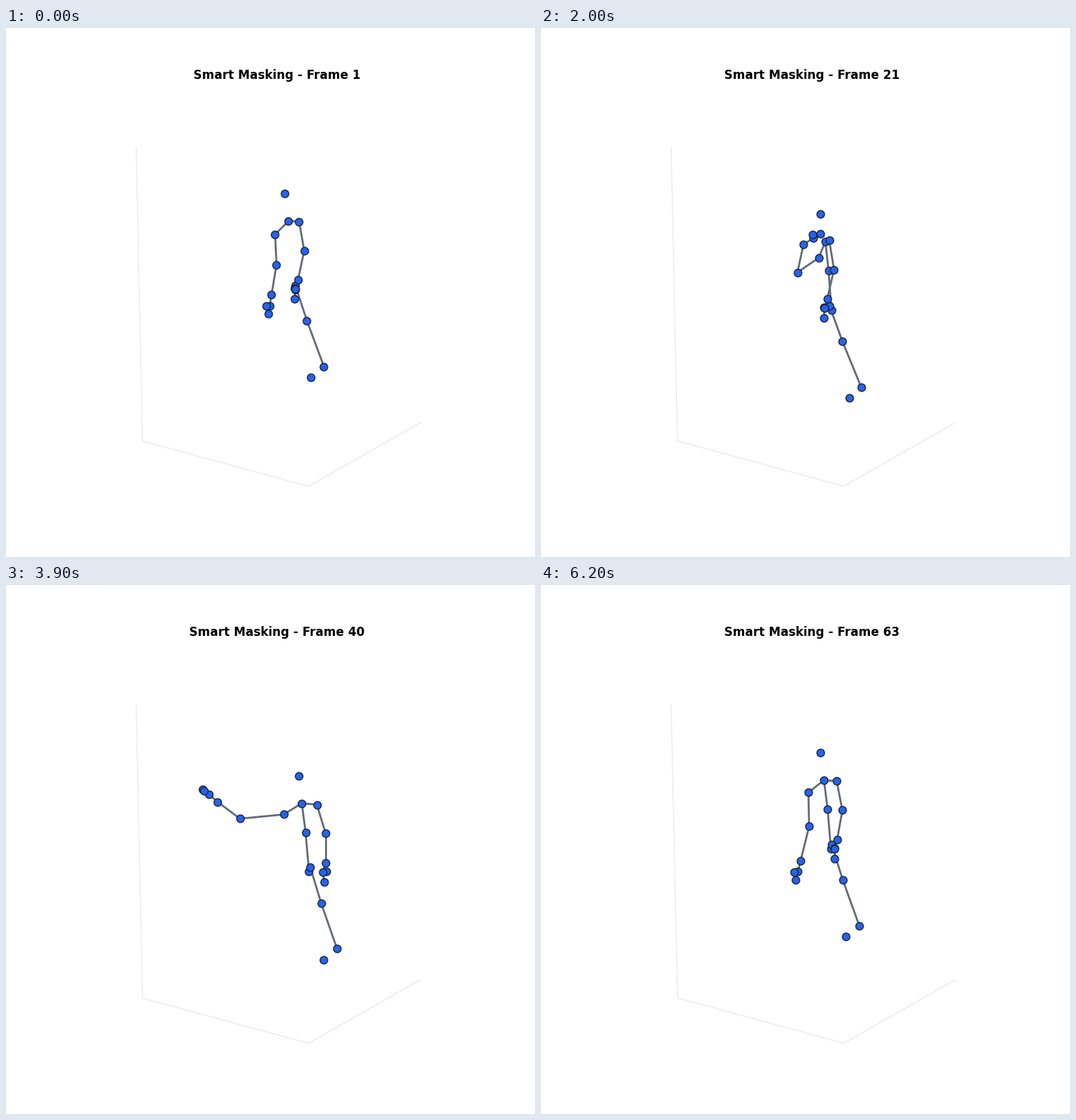
Animation, 748 px wide and 748 px high, one loop 6300 ms. Source, as a matplotlib script:

```python
import numpy as np
import matplotlib.pyplot as plt
from matplotlib.animation import FuncAnimation
from matplotlib.collections import LineCollection

SIZE, DPI = 748, 100
FRAMES, INTERVAL = 63, 100
SPINE_FROM = 4  # the spine joint stays masked until here

# Offset from the foot, and how far the body's twist shifts the joint sideways.
BODY = {
    "head": (-37.5 - 260j, 0.4),
    "neck": (-32 - 221j, 0.2),
    "spine": (-27 - 180j, 0.25),
    "pelvis": (-22.5 - 124.5j, 0.3),
    "hip": (-22.5 - 130.5j, 0.6),
    "knee": (-6 - 80j, 0.4),
    "ankle": (18 - 15.5j, 0.15),
    "foot": (0, 0),
}

CHAINS = [
    ["r_tip", "r_hand", "r_wrist", "r_elbow", "r_shoulder", "neck",
     "l_shoulder", "l_elbow", "l_wrist", "l_hand", "l_tip"],
    ["neck", "spine", "pelvis", "hip", "knee", "ankle"],
    ["r_hand", "r_thumb"],
    ["l_hand", "l_thumb"],
]
BONES = [pair for chain in CHAINS for pair in zip(chain, chain[1:])]


def track(*keys):
    """Ease through (frame, value) keys; flat at the ends and the extremes."""
    times, values = np.array(keys, float).T
    h = np.diff(times)
    d = np.diff(values) / h
    m = np.zeros(len(times))
    rising = d[:-1] * d[1:] > 0
    a, b = d[:-1][rising], d[1:][rising]
    m[1:-1][rising] = 2 * a * b / (a + b)
    t = np.clip(np.arange(FRAMES), times[0], times[-1])
    i = np.clip(np.searchsorted(times, t, side="right") - 1, 0, len(h) - 1)
    s = (t - times[i]) / h[i]
    return (values[i] * (1 + 2 * s) * (1 - s) ** 2
            + values[i + 1] * s * s * (3 - 2 * s)
            + h[i] * s * (1 - s) * (m[i] * (1 - s) - m[i + 1] * s))


def path(*keys):
    """Ease through (frame, point) keys, points being complex numbers."""
    return (track(*((t, p.real) for t, p in keys))
            + 1j * track(*((t, p.imag) for t, p in keys)))


def bone(length, degrees):
    """A bone hanging down, swung to the left by an angle."""
    return length * 1j * np.exp(1j * np.radians(degrees))


def build_joints():
    foot = path((0, 431.5 + 494j), (13, 446.5 + 509j), (20, 436 + 523j),
                (31, 450 + 538.5j), (39, 449 + 529.5j), (48, 434 + 502.5j),
                (62, 431.5 + 497j))
    # Apparent shoulder width, which tells how far the body has turned.
    width = track((0, 15), (20, 5.5), (28, 15), (48, 23.5), (62, 18))
    joints = {name: foot + offset + gain * (width - 15)
              for name, (offset, gain) in BODY.items()}
    neck = joints["neck"]

    # Resting arm: everything follows the forearm's swing.
    swing = track((0, 12), (20, 13), (28, 27), (39, 0), (62, 10))
    shoulder = neck + width + 0.25j * (width - 13)
    elbow = shoulder + bone(42, 0.6 * swing - 17)
    wrist = elbow + bone(42.5, swing)
    hand = wrist + bone(13.5, 17)
    joints.update(l_shoulder=shoulder, l_elbow=elbow, l_wrist=wrist,
                  l_thumb=hand - 0.5 * (swing - 11) - 1j,
                  l_hand=hand, l_tip=hand + bone(14, swing - 10))

    # Waving arm: reach out, fold up, lift, reach again and drop.
    upper = path((6, 2 + 43j), (13, -6.5 + 38j), (20, -30 + 20.5j),
                 (28, -45 - 15j), (39, -62 + 6j), (48, -11 + 42j),
                 (62, 1 + 48j))
    fore = path((6, -7 + 42j), (13, -58 + 2j), (20, 8.5 - 39.5j),
                (28, -13 - 36.5j), (39, -31.5 - 23.5j), (48, -23.5 + 33.5j),
                (62, -12 + 48.5j))
    shoulder = neck - (width + 4) + 1j * (25.5 - 0.45 * width)
    elbow = shoulder + upper
    wrist = elbow + fore
    aim = fore / abs(fore)
    # The hand bends inward once the forearm points up.
    bend = 45 * np.clip(-2.5 * aim.imag - 1.4, 0, 1)
    aim = aim * np.exp(1j * np.radians(bend))
    hand = wrist + 16 * aim
    joints.update(r_shoulder=shoulder, r_elbow=elbow, r_wrist=wrist,
                  r_hand=hand, r_tip=hand + 12 * aim,
                  r_thumb=hand + 4 * aim - 4 - 3j)
    return joints


joints = build_joints()

fig = plt.figure(figsize=(SIZE / DPI, SIZE / DPI), dpi=DPI, facecolor="white")
ax = fig.add_axes([0, 0, 1, 1])
ax.set_xlim(0, SIZE)
ax.set_ylim(SIZE, 0)
ax.axis("off")

ax.plot([184, 193, 428, 586], [169, 584, 648, 558], color="0.9", lw=0.8)
bones = LineCollection([], colors="#626c79", linewidths=2, zorder=2)
ax.add_collection(bones)
dots = ax.scatter([], [], s=60, c="#2563eb", edgecolors="#1a2230",
                  linewidths=1, zorder=3)
title = ax.text(383.3, 72, "", ha="center", va="baseline", fontsize=12.1,
                fontweight="bold", family="DejaVu Sans", color="black")


def update(n):
    points = {name: (p[n].real, p[n].imag) for name, p in joints.items()
              if name != "spine" or n >= SPINE_FROM}
    bones.set_segments([[points[a], points[b]] for a, b in BONES
                        if a in points and b in points])
    dots.set_offsets(list(points.values()))
    title.set_text(f"Smart Masking - Frame {n + 1}")
    return bones, dots, title


anim = FuncAnimation(fig, update, frames=FRAMES, interval=INTERVAL,
                     repeat=True, repeat_delay=0)
plt.show()
```
